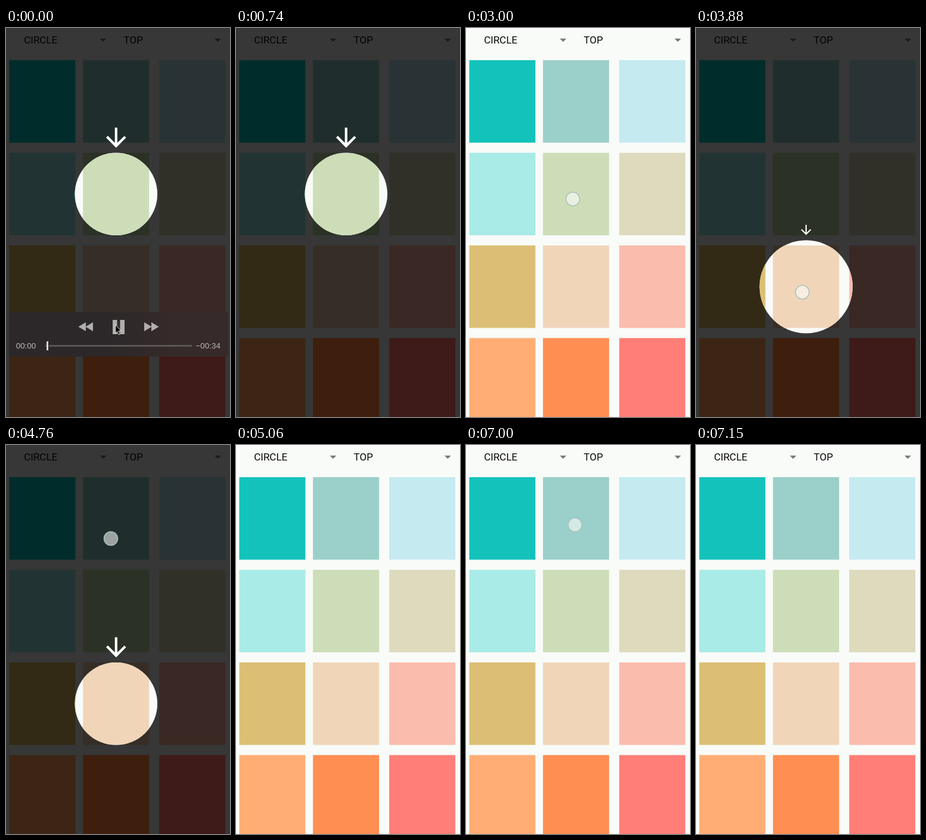
These frames come from a looping animation (376 px wide and 653 px high, 8 s). An HTML page:

```html
<!DOCTYPE html>
<html lang="en">
<head>
<meta charset="utf-8">
<title>Spotlight on a colour grid</title>
<style>
  html, body { margin: 0; width: 100%; height: 100%; overflow: hidden; background: #f9fbf8; }
  svg { display: block; }
  .menu { font: 17px Roboto, sans-serif; fill: #080808; }
  .clock { font: 13.4px "Liberation Sans", Arial, sans-serif; fill: #bab7b7; }
  .dimmed { filter: brightness(.218) saturate(1.3); }
</style>
</head>
<body>
<svg width="376" height="653" viewBox="0 0 376 653">
  <clipPath id="hole"><circle id="lens"/></clipPath>

  <g id="back">
    <g id="page">
      <rect width="376" height="653" fill="#f9fbf8"/>
      <text class="menu" x="30.2" y="26.4">CIRCLE</text>
      <text class="menu" x="197.6" y="26.4">TOP</text>
      <path fill="#777b78" d="M157.5 17.7h11l-5.5 5.5zM350 17.7h11l-5.5 5.5z"/>
      <g id="grid"></g>
    </g>
  </g>

  <g id="spot">
    <use href="#page" clip-path="url(#hole)"/>
    <path id="arrow" fill="#fff" d="M20 12l-1.41-1.41L13 16.17V4h-2v12.17l-5.58-5.59L4 12l8 8z"/>
  </g>

  <g id="player">
    <linearGradient id="shade">
      <stop offset=".45" stop-color="#2c2829"/>
      <stop offset=".75" stop-color="#362a2a"/>
    </linearGradient>
    <rect x="5.5" y="477" width="367.5" height="74.5" rx="2" fill="url(#shade)"/>
    <path fill="#b0adad" d="M134 494v15l-12.5-7.5zM146 494v15l-12.5-7.5zM232 494v15l12.5-7.5zM244 494v15l12.5-7.5z
      M179 490h7.5v24h-7.5zM191.5 490h7.5v24h-7.5z"/>
    <path fill="#5a5555" d="M65.5 532h246.5v3h-246.5z"/>
    <path stroke="#2c2829" fill="#d8d6d6" d="M67.5 525.5h4v16h-4z"/>
    <text class="clock" x="16.7" y="538">00:00</text>
    <text class="clock" x="318.5" y="538">−00:34</text>
    <path stroke="#fff" stroke-width=".9" d="M183.5 498v14.5l3.2-3 2.4 5.3 2.3-1-2.3-5.2h4.4z"/>
  </g>

  <circle id="touch" r="11.5" fill="#fff" fill-opacity=".56" stroke="#a9c1b9" stroke-width="1.5"/>
</svg>
<script>
const LOOP = 8000, STEP = 145, CX = 184.8, R = 69.3;
const $ = id => document.getElementById(id);
const clamp = v => Math.max(0, Math.min(1, v));
const rowY = row => 54 + row * 155.5;
const overshoot = s => 1 + 3 * (s - 1) ** 3 + 2 * (s - 1) ** 2;

const colors = ['#14c2bc', '#9bcfc9', '#c5eaf0', '#a9ebe7', '#cdddb8', '#dedabe',
                '#dcbf75', '#f0d5b9', '#fabcad', '#ffad75', '#ff8e53', '#ff7e77'];
$('grid').innerHTML = colors.map((c, i) =>
  `<rect x="${[5.5, 129.2, 257.2][i % 3]}" y="${rowY(Math.floor(i / 3))}" width="111" height="138.5" fill="${c}"/>`
).join('');

// lead: how far the opening has come when the spotlight first shows
const spots = [
  { from: 0, to: 890, row: 1, lead: 1 },
  { from: 3880, to: 4910, row: 2, lead: .51 },
  { from: 5510, to: 7000, row: 0, lead: .37 }
];
const touches = [
  { from: 3000, to: 3150, x: 179.3, y: 287 },
  { from: 3740, to: 4030, x: 178.5, y: 443.5 },
  { from: 4760, to: 5060, x: 176, y: 157 },
  { from: 7000, to: 7150, x: 183, y: 134 }
];

const active = (list, t) => list.find(e => t >= e.from && t < e.to);
const steps = (t, from) => Math.floor((t - from) / STEP);

function set(id, attrs) {
  for (const name in attrs) $(id).setAttribute(name, attrs[name]);
}

function drawSpot(t) {
  const spot = active(spots, t);
  $('back').classList.toggle('dimmed', !!spot);
  $('spot').style.display = spot ? '' : 'none';
  if (!spot) return;
  const s = clamp(spot.lead + steps(t, spot.from) / 2);
  const cy = rowY(spot.row) + R, r = R * overshoot(s);
  set('lens', { cx: CX, cy, r });
  set('arrow', { transform: `translate(${CX} ${cy - r - 8.6}) scale(${2.1 * s}) translate(-12 -20)` });
}

function drawTouch(t) {
  const touch = active(touches, t);
  $('touch').style.display = touch ? '' : 'none';
  if (touch) set('touch', { cx: touch.x, cy: touch.y, opacity: .3 ** steps(t, touch.from) });
}

function draw(t) {
  drawSpot(t);
  drawTouch(t);
  set('player', { opacity: clamp(1.5 - steps(t, 0) / 2) });
}

const start = performance.now();
function frame() {
  draw((performance.now() - start) % LOOP);
  requestAnimationFrame(frame);
}
frame();
</script>
</body>
</html>
```
